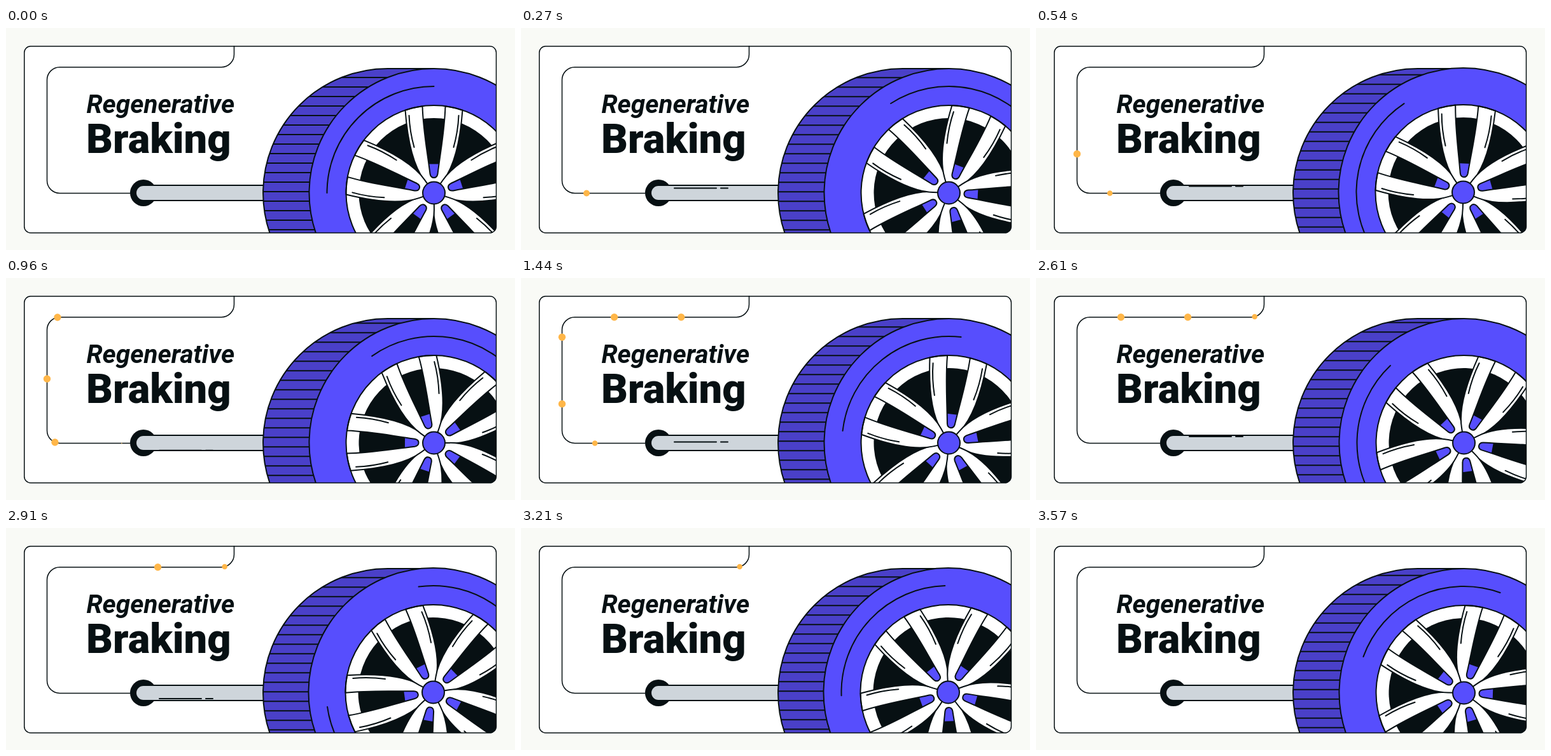
Recreate the animation shown at these times as an HTML page. Size 800 px wide and 350 px high, loop 3.6 s.

```html
<!DOCTYPE html>
<html lang="en">
<head>
<meta charset="utf-8">
<title>Regenerative Braking</title>
<style>
  html, body { margin: 0; width: 100%; height: 100%; overflow: hidden; background: #f9faf6; }
  svg { display: block; width: 800px; height: 350px; }
  text { font-family: Roboto, sans-serif; font-weight: 700; fill: #071013; }
  .line { fill: none; stroke: #071013; stroke-width: 2; stroke-linecap: round; }
  .ink { stroke: #071013; stroke-width: 2; }
</style>
</head>
<body>
<svg viewBox="0 0 800 350">
  <defs>
    <clipPath id="card"><rect x="28.75" y="28.75" width="741.75" height="294.25" rx="10"/></clipPath>
    <clipPath id="tread"><path d="M672 64H600A196 196 0 0 0 600 456H672Z"/></clipPath>
    <clipPath id="shaft"><rect x="204" y="247" width="220" height="26"/></clipPath>
    <g id="spokes">
      <path d="M0-22V-45.5" stroke="#574efd" stroke-width="17"/>
      <path class="ink" fill="#fff" stroke-linejoin="round" d="M-45-130.5C-42-90-34-45-15-20L0 0 15-20C34-45 42-90 45-130.5A138 138 0 0 0 18-136.8C17-100 11-70 6-30Q5-24 0-24Q-5-24-6-30C-11-70-17-100-18-136.8A138 138 0 0 0-45-130.5Z"/>
      <path class="line" d="M39-122Q38-97 31-72M-39-122Q-38-97-31-72"/>
    </g>
  </defs>

  <rect x="28.75" y="28.75" width="741.75" height="294.25" rx="10" fill="#fff"/>
  <path id="wire" class="line" style="stroke-width:1.5" d="M195 260.5H84.5a20 20 0 0 1-20-20V81.75a20 20 0 0 1 20-20H338.5a20 20 0 0 0 20-20V28.5"/>
  <g id="charges" fill="#ffb648"></g>

  <circle cx="216" cy="260" r="21" fill="#071013"/>
  <rect class="ink" x="204" y="248" width="230" height="24" rx="12" fill="#ced5db"/>
  <g clip-path="url(#shaft)"><path id="glint" class="line" d="M241 0H307M314 0H325"/></g>

  <g clip-path="url(#card)">
    <g clip-path="url(#tread)">
      <rect x="400" y="60" width="280" height="270" fill="#4a40c9"/>
      <path id="grooves" d="M540 0V350" stroke="#071013" stroke-width="280" stroke-dasharray="2 13"/>
    </g>
    <path class="line" d="M672 64H600A196 196 0 0 0 600 456"/>
    <g id="wheel">
      <circle class="ink" r="196" fill="#574efd"/>
      <g id="spin">
        <path class="line" d="M-168 0A168 168 0 0 1 0-168M168 0A168 168 0 0 1 0 168"/>
        <circle r="138" fill="#fff"/>
        <circle r="118" fill="#071013"/>
        <use href="#spokes"/>
        <use href="#spokes" transform="rotate(72)"/>
        <use href="#spokes" transform="rotate(144)"/>
        <use href="#spokes" transform="rotate(216)"/>
        <use href="#spokes" transform="rotate(288)"/>
      </g>
      <circle class="line" r="138"/>
      <circle class="ink" r="17.5" fill="#574efd"/>
    </g>
  </g>
  <rect class="line" style="stroke-width:1.5" x="28.75" y="28.75" width="741.75" height="294.25" rx="10"/>

  <text x="126.5" y="134" font-size="40.5" font-style="italic">Regenerative</text>
  <text x="126" y="196.5" font-size="65" style="font-weight:900">Braking</text>
</svg>
<script>
const LOOP = 3600, STEPS = 96, HALF = STEPS / 2, CHARGES = 6, RADIUS = 5.7, GROOVE = 15, SHAFT = 25;
const $ = id => document.getElementById(id);
const wire = $('wire'), wireLength = wire.getTotalLength();
const charges = Array.from({ length: CHARGES }, () =>
  $('charges').appendChild(document.createElementNS('http://www.w3.org/2000/svg', 'circle')));

// Cubic Bezier ease-in with handles (.22, 0) and (.63, 0)
function easeIn(x) {
  let low = 0, high = 1;
  for (let i = 0; i < 24; i++) {
    const s = (low + high) / 2, r = 1 - s;
    if (.66 * s * r * r + 1.89 * s * s * r + s * s * s < x) low = s; else high = s;
  }
  return low ** 3;
}

function draw(step) {
  // One turn slowing to a stop, then one turn speeding up
  const u = step / HALF - 1, braking = u < 0;
  const turns = Math.sign(u) * easeIn(Math.abs(u));
  const shake = Math.abs(u) > .5 && (step % 4 === 1 || step % 4 === 2) ? -1 : 0;
  $('wheel').setAttribute('transform', `translate(${672.5 + shake} ${260 + shake})`);
  $('spin').setAttribute('transform', `rotate(${-360 * turns})`);
  $('grooves').setAttribute('stroke-dashoffset', -2 - shake - GROOVE * (braking ? 3 : 4) * turns);

  const sweep = (braking ? 3.5 : 5) * turns, phase = sweep - Math.round(sweep);
  $('glint').setAttribute('transform', `translate(0 ${260 + SHAFT * phase})`);
  $('glint').style.opacity = step < STEPS - 1 ? 1 : 0;

  charges.forEach((dot, i) => {
    const age = step - 8 * i;
    const scale = Math.max(0, Math.min(1, age / 8, (HALF - age) / 4));
    const p = wire.getPointAtLength(wireLength * Math.max(0, Math.min(1, age / HALF)));
    dot.setAttribute('cx', p.x);
    dot.setAttribute('cy', p.y);
    dot.setAttribute('r', RADIUS * scale);
  });
}

const start = performance.now();
function tick() {
  const time = (performance.now() - start) % LOOP;
  draw(Math.floor(time * STEPS / LOOP));
  requestAnimationFrame(tick);
}
tick();
</script>
</body>
</html>
```
